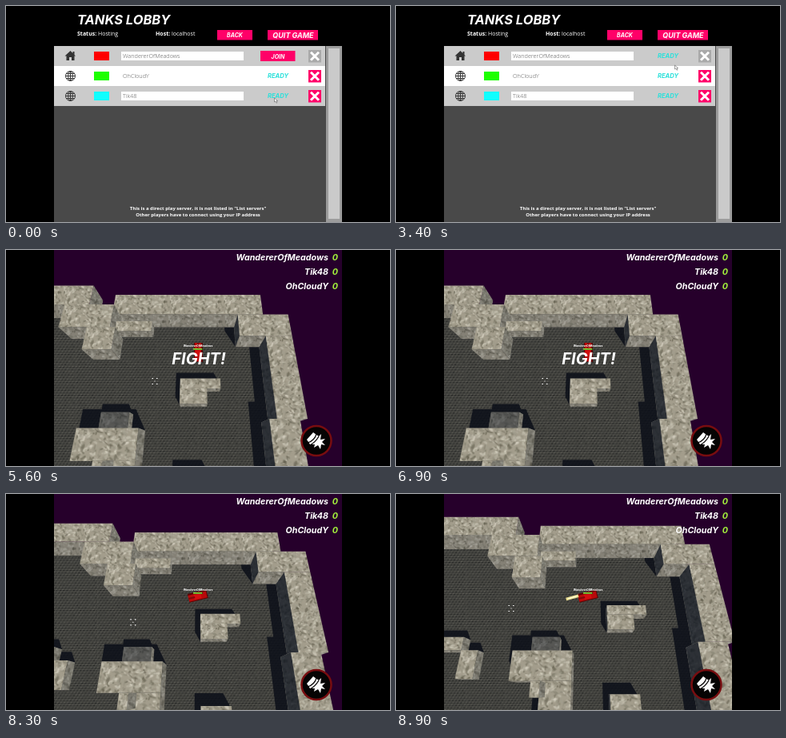
An HTML page with a canvas that plays this animation: 480x270 px, repeating every 9 s.

```html
<!DOCTYPE html>
<html lang="en">
<head>
<meta charset="utf-8">
<title>Tanks lobby</title>
<style>
html, body { margin: 0; width: 100%; height: 100%; overflow: hidden; background: #000; }
canvas, svg { position: absolute; top: 0; left: 0; }
canvas { left: 60px; }
text { font-family: "Open Sans", sans-serif; font-size: 7px; fill: #fff; }
.h { font-family: Inter, sans-serif; font-weight: 700; font-style: italic; }
.b { font-weight: 700; }
.m { text-anchor: middle; }
.name { fill: #555; font-weight: 300; font-size: 7.3px; }
.score { text-anchor: end; font-size: 10.7px; }
.green { fill: #a4f23c; }
.ready { fill: #2ce0da; font-size: 7.6px; }
.pink { fill: #ff0068; }
.title { font-size: 16.5px; }
.quit { font-size: 9px; }
.note { font-size: 6px; }
.big { font-size: 14px; }
.huge { font-size: 20px; }
.tiny { font-size: 3.4px; }
</style>
</head>
<body>
<canvas id="scene" width="360" height="270"></canvas>
<svg width="480" height="270" viewBox="0 0 480 270">
  <defs>
    <g id="globe" fill="none" stroke="#333">
      <circle r="6"/><ellipse rx="2.8" ry="6"/>
      <path d="M-6 0H6M0-6V6M-5-3H5M-5 3H5"/>
    </g>
    <path id="house" d="M-7 0L0-6.500L3-3.500V-5.500H5V-1.500L6.500 0H5V5.500H1.500V1.500H-1.500V5.500H-5V0Z" fill="#333"/>
    <path id="cross" d="M-5-5L5 5M5-5L-5 5" stroke="#fff" stroke-width="3"/>
  </defs>
  <g id="lobby">
    <rect width="480" height="270"/>
    <text class="h title" x="89" y="23">TANKS LOBBY</text>
    <text x="89" y="37"><tspan class="b">Status:</tspan> Hosting</text>
    <text x="187" y="37"><tspan class="b">Host:</tspan> localhost</text>
    <rect class="pink" x="264" y="30" width="44" height="12.5"/>
    <text class="h m" x="286" y="39">BACK</text>
    <rect class="pink" x="327" y="30" width="63" height="12.5"/>
    <text class="h m quit" x="359" y="39.5">QUIT GAME</text>
    <rect x="60" y="50" width="340" height="220" fill="#494949"/>
    <rect x="400" y="50" width="20" height="220" fill="#9c9c9c"/>
    <rect x="403" y="53" width="14" height="213" fill="#cacaca"/>
    <g id="rows"></g>
    <g id="join">
      <rect class="pink" x="318" y="56" width="43.5" height="13"/>
      <text class="h m" x="340" y="65.5">JOIN</text>
    </g>
    <text class="b m note" x="240" y="255">This is a direct play server, it is not listed in "List servers"</text>
    <text class="b m note" x="240" y="263">Other players have to connect using your IP address</text>
    <g id="match">
      <rect x="126.5" y="114.5" width="232" height="42" fill="#43191b" stroke="#301214"/>
      <text id="count" class="h m big" x="243" y="140.5"></text>
    </g>
    <path id="cursor" d="M-1.5-3V2L-.2 1L1 3.200L2 2.700L1 .6H2.500Z" fill="#fff" stroke="#444" stroke-width=".5"/>
  </g>
  <g id="hud">
    <text class="h m tiny" x="240" y="121">WandererOfMeadows</text>
    <text id="fight" class="h m huge" x="241" y="143">FIGHT!</text>
    <g id="first"></g>
    <g id="scores"></g>
    <circle cx="388" cy="238.5" r="18.5" fill="#060404" stroke="#780d10" stroke-width="2.5"/>
    <path d="M376 237L384 228L391 233L394 230L393 237L399 236L395 240L399 244L394 243L393 249L390 244L385 247L386 243L380 243Z" fill="#fff"/>
    <path d="M377 241Q386 238 388 230M380 244Q387 240 391 233" fill="none" stroke="#060404" stroke-width="1.2"/>
    <path id="aim" d="M-3.500-3.500h1.500M2-3.500h1.500M-3.500 3.500h1.500M2 3.500h1.500M-.5 0h1" stroke="#fff" stroke-width="1.2"/>
  </g>
</svg>
<script>
const $ = id => document.getElementById(id);
const ctx = $('scene').getContext('2d');
const LOOP = 9000, STEP = 100;
const JOIN = 1400, GAME = 4200, ROUND = 5600, DRIVE = 7200, SHOT = 8800, END = 8900;

const players = [['WandererOfMeadows', '#f00'], ['OhCloudY', '#1cff00'], ['Tik48', '#1ff']];

$('rows').innerHTML = players.map(([name, color], i) => `<g transform="translate(0 ${50 + i * 25})">
  <rect x="60" width="339" height="25" fill="${i === 1 ? '#fff' : '#cbcbcb'}"/>
  <use href="#${i ? 'globe' : 'house'}" x="80.5" y="12.5"/>
  <rect x="110" y="7" width="19" height="11" fill="${color}"/>
  <rect x="144" y="7" width="153" height="11" fill="#fff"/>
  <text class="name" x="146" y="15">${name}</text>
  <text class="h m ready" x="340" y="15">READY</text>
  <rect x="378" y="5" width="16" height="15.5" fill="${i ? '#ff0068' : '#a9a9a9'}"/>
  <use href="#cross" x="386" y="12.7"/></g>`).join('');

const scoreRow = (name, points, i) => `<text class="h score" x="403" y="${13 + i * 18}">${name}</text>
  <text class="h score green" x="415" y="${13 + i * 18}">${points}</text>`;
$('first').innerHTML = scoreRow('PLAYER qwe', 5, 0);
$('scores').innerHTML = [0, 2, 1].map((p, i) => scoreRow(players[p][0], 0, i)).join('');

// level on a grid of cells: column, row, width, depth
const tall = [
  [-9, -.5, 8, 1], [0, 0, 6, 1], [-2, .5, 2, 1.1], [-.9, 1.6, 1.1, 1], [5, 1, 2, 1],
  [6, 2, 1, 3.2], [5.75, 5.2, 1, 5], [-.5, 5.5, 2, 1], [.5, 6.5, 1, 3], [.2, 6.5, .3, .5]
];
const low = [[0, 1, 1.5, .5], [2.75, 3.6, 1.5, .4], [2.75, 4, 1, .6],
  [-9, 4.9, 6.5, .5], [-2.5, 5.4, .6, 1], [2.75, 6.9, 1, 3]];
const dim = [[0, 4.9, 1, .6]];
const group = (list, h, shade) => list.map(([x, z, w, d]) => ({ l: x, r: x + w, f: z, n: z + d, h, shade }));
const boxes = [...group(tall, 1, 0), ...group(low, .5, 0), ...group(dim, .5, .5)].sort((a, b) => a.f - b.f);

const mix = (a, b, u) => a + (b - a) * u;
const ramp = (t, a, b) => Math.min(1, Math.max(0, (t - a) / (b - a)));
const ease = u => u * u * (3 - 2 * u);

let seed = 7;
const rnd = () => (seed = (seed * 16807) % 2147483647) / 2147483647;

function texture(size, paint) {
  const c = document.createElement('canvas');
  c.width = c.height = size;
  paint(c.getContext('2d'), size);
  return ctx.createPattern(c, 'repeat');
}

const rock = texture(80, (g, size) => {
  g.fillStyle = '#a39d8c';
  g.fillRect(0, 0, size, size);
  for (let i = 0; i < 700; i++) {
    const v = mix(85, 228, rnd()) | 0;
    g.fillStyle = `rgba(${v},${v - 4},${v - 20},.55)`;
    g.beginPath();
    g.ellipse(rnd() * size, rnd() * size, 1 + rnd() * 3, .5 + rnd() * 1.2, rnd() * 3.14, 0, 7);
    g.fill();
  }
});

const weave = texture(48, (g, size) => {
  g.fillStyle = '#42423e';
  g.fillRect(0, 0, size, size);
  for (let y = 0; y < size; y += 3) for (let x = 0; x < size; x += 4) {
    const o = y % 2 * 2;
    g.fillStyle = `rgba(118,117,108,${.2 + rnd() * .35})`;
    g.fillRect((x + o) % size, y, 2, 1);
    g.fillStyle = `rgba(10,12,14,${.25 + rnd() * .3})`;
    g.fillRect((x + o + 1) % size, y + 1, 2, 1);
  }
});

let panX = 0, panZ = 0, light = 1;

// perspective of a tilted camera; h = 0 on the floor, 1 on wall tops
const side = x => .0524 * x - .179 + panX;
function proj(x, z, h) {
  const drop = .134 * (1 - h), k = 1000 / (1.739 - .071 * z + panZ + 1.3 * drop);
  return [240 + side(x) * k, (1 + drop) * k - 519];
}

function trace(pts) {
  pts.forEach(([x, y], i) => i ? ctx.lineTo(x, y) : ctx.moveTo(x, y));
  ctx.closePath();
}

function face(pts, pattern, shade, [x, y] = pts[0]) {
  const s = (y + 519) / 680;
  pattern.setTransform(new DOMMatrix([s, 0, 0, s, x, y]));
  ctx.beginPath();
  trace(pts);
  ctx.fillStyle = pattern;
  ctx.fill();
  ctx.fillStyle = `rgba(12,18,30,${shade})`;
  ctx.fill();
  if (light < 1) {
    ctx.globalCompositeOperation = 'multiply';
    ctx.fillStyle = `rgba(172,150,106,${1 - light})`;
    ctx.fill();
    ctx.globalCompositeOperation = 'source-over';
  }
}

function drawBox({ l, r, n, f, h, shade }) {
  const wall = (a, b, dark) => face([proj(...a, h), proj(...b, h), proj(...b, 0), proj(...a, 0)], rock, dark);
  if (side(l) > 0) wall([l, f], [l, n], .92 - .14 * light);
  if (side(r) < 0) wall([r, n], [r, f], .45 - .2 * light);
  wall([l, n], [r, n], .42 - .22 * light);
  face([proj(l, f, h), proj(r, f, h), proj(r, n, h), proj(l, n, h)], rock, shade);
}

function drawFloor() {
  const floor = [[-10, 0], [6, 0], [6.6, 2], [6.6, 10.4], [-10, 10.4]].map(([x, z]) => proj(x, z, 0));
  face(floor, weave, 0, proj(3.4, 4.8, 0));
  ctx.save();
  ctx.clip();
  ctx.beginPath();
  for (const { l, r, n, f, h } of boxes) {
    const a = .42 * h, b = .8 * h;
    trace([[l, n], [r, n], [r, f], [r - a, f - b], [l - a, f - b], [l - a, n - b]].map(([x, z]) => proj(x, z, 0)));
  }
  ctx.fillStyle = `rgba(${10 * light},${14 * light},${23 * light},${.95 - .12 * light})`;
  ctx.fill();
  ctx.restore();
}

function rect(color, ...r) {
  ctx.fillStyle = color;
  ctx.fillRect(...r);
}

function turned(x, y, angle, paint) {
  ctx.save();
  ctx.translate(x, y);
  ctx.rotate(angle);
  paint();
  ctx.restore();
}

function drawTank(t, u) {
  turned(240, 128, mix(90, -14, Math.min(1, u / .6)) * Math.PI / 180, () => {
    rect('#5c0505', -12, -6, 24, 11);
    rect('#b80a0a', -12, -4, 23, 8);
    rect('#d21010', -5, -3, 9, 6);
    rect('#7d0707', -12, -1, 8, 2);
  });
  rect('#3a4a10', 234, 123, 12, 2);
  rect('#8be03a', 234, 123, 11, 1.5);
  if (t >= SHOT) turned(228, 127, -.27, () => {
    rect('#e9dc8c', -16, -1.5, 16, 3.5);
    rect('#fffbd0', -14, -.5, 12, 1.5);
  });
}

function drawGame(t) {
  const u = ramp(t, DRIVE, END);
  panX = .073 * u ** 1.4;
  panZ = .051 * u ** 1.65;
  light = ramp(t, 4500, 5100);
  ctx.setTransform(1, 0, 0, 1, -60, 0);
  rect('#26002b', 60, 0, 360, 270);
  drawFloor();
  boxes.forEach(drawBox);
  drawTank(t, u);
  const sweep = ease(ramp(t, GAME, ROUND));
  place('aim', mix(304, 186, sweep) - 42 * u, mix(130, 164, sweep) - 21 * u ** 4);
}

const show = (id, on) => $(id).style.display = on ? '' : 'none';
const place = (id, x, y) => $(id).setAttribute('transform', `translate(${x} ${y})`);

function drawLobby(t) {
  const joined = t >= JOIN, up = ease(ramp(t, 0, 400)), off = ease(ramp(t, JOIN, 2100));
  show('join', !joined);
  $('rows').querySelector('.ready').style.display = joined ? '' : 'none';
  show('match', joined && t < 3400);
  $('count').textContent = 'Match Starting in ' + (2 - Math.floor((t - JOIN) / 1000));
  place('cursor', 337 + 4 * up + 9 * off, 118 - 54 * up + 13 * off);
}

function draw(t) {
  const playing = t >= GAME;
  show('lobby', !playing);
  show('hud', playing);
  show('first', t < ROUND);
  show('scores', t >= ROUND);
  show('fight', t >= ROUND && t < DRIVE);
  if (playing) drawGame(t);
  else drawLobby(t);
}

const start = performance.now();
let last = -1;
function tick() {
  const t = Math.floor((performance.now() - start) % LOOP / STEP) * STEP;
  if (t !== last) draw(last = t);
  requestAnimationFrame(tick);
}
tick();
</script>
</body>
</html>
```
